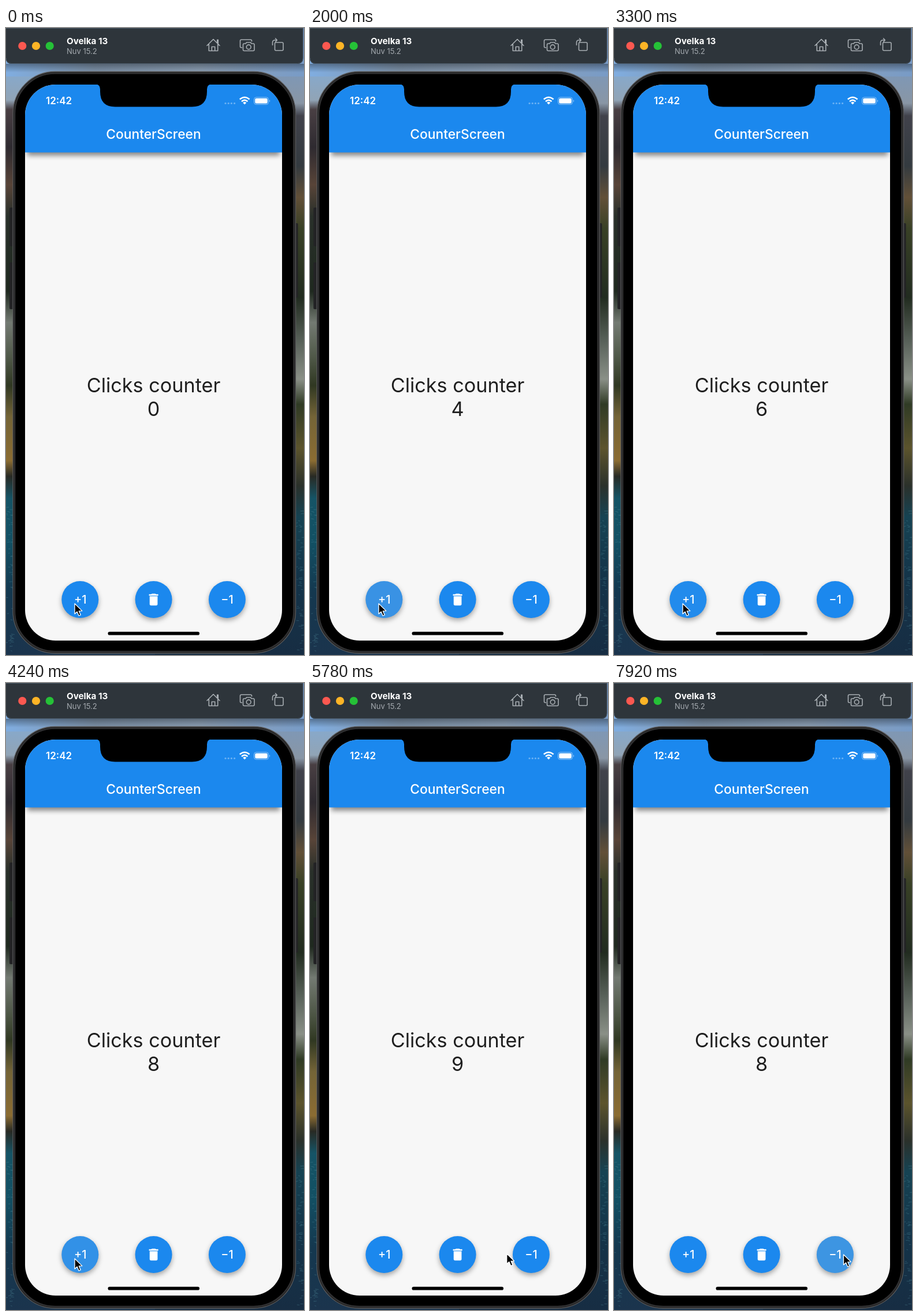
Recreate the animation shown at these times as an HTML page. Size 516 by 1086 pixels, loop 8 s.

```html
<!DOCTYPE html>
<html lang="en">
<head>
<meta charset="utf-8">
<title>Counter</title>
<style>
  html, body { margin: 0; width: 100%; height: 100%; overflow: hidden; background: #152a3c; }
  svg { display: block; width: 100vw; height: 100vh; font-family: Inter, sans-serif; }
  .mid { text-anchor: middle; }
  .fab { filter: drop-shadow(0 4px 4px rgba(0, 0, 0, .34)); }
  .label { font-size: 19.8px; font-weight: 500; fill: #fff; }
  .big { font-size: 34.2px; fill: #1f1f1f; }
  .tool { fill: none; stroke: #a7adb2; stroke-width: 1.6; stroke-linejoin: round; stroke-linecap: round; }
</style>
</head>
<body>
<svg viewBox="0 0 516 1086">
  <defs>
    <linearGradient id="left" x2="0" y2="1086" gradientUnits="userSpaceOnUse">
      <stop offset=".06" stop-color="#83aad2"/>
      <stop offset=".115" stop-color="#91a4b6"/>
      <stop offset=".13" stop-color="#493f43"/>
      <stop offset=".19" stop-color="#2e2a30"/>
      <stop offset=".25" stop-color="#584438"/>
      <stop offset=".3" stop-color="#29302a"/>
      <stop offset=".42" stop-color="#1f291f"/>
      <stop offset=".47" stop-color="#737a72"/>
      <stop offset=".53" stop-color="#4c5544"/>
      <stop offset=".57" stop-color="#303822"/>
      <stop offset=".62" stop-color="#746437"/>
      <stop offset=".69" stop-color="#8b6c32"/>
      <stop offset=".715" stop-color="#282a24"/>
      <stop offset=".75" stop-color="#155466"/>
      <stop offset=".82" stop-color="#125064"/>
      <stop offset=".9" stop-color="#14384f"/>
      <stop offset="1" stop-color="#1b344d"/>
    </linearGradient>
    <linearGradient id="right" x2="0" y2="1086" gradientUnits="userSpaceOnUse">
      <stop offset=".06" stop-color="#7b98bb"/>
      <stop offset=".12" stop-color="#8996a5"/>
      <stop offset=".14" stop-color="#41424b"/>
      <stop offset=".22" stop-color="#343b40"/>
      <stop offset=".27" stop-color="#625038"/>
      <stop offset=".32" stop-color="#394126"/>
      <stop offset=".43" stop-color="#222c20"/>
      <stop offset=".5" stop-color="#59625a"/>
      <stop offset=".56" stop-color="#8a9087"/>
      <stop offset=".6" stop-color="#303b25"/>
      <stop offset=".67" stop-color="#5c542d"/>
      <stop offset=".73" stop-color="#2b312b"/>
      <stop offset=".78" stop-color="#164353"/>
      <stop offset=".88" stop-color="#143449"/>
      <stop offset="1" stop-color="#172d43"/>
    </linearGradient>
    <linearGradient id="sky">
      <stop stop-color="#80ade0"/>
      <stop offset=".3" stop-color="#8095ac"/>
      <stop offset=".65" stop-color="#8fa3b9"/>
      <stop offset="1" stop-color="#789bc6"/>
    </linearGradient>
    <linearGradient id="shade" x2="0" y2="1">
      <stop stop-color="#000" stop-opacity=".34"/>
      <stop offset="1" stop-color="#000" stop-opacity="0"/>
    </linearGradient>
    <filter id="soft" x="-10%" y="-50%" width="120%" height="200%"><feGaussianBlur stdDeviation="4.5"/></filter>
    <clipPath id="screen"><rect x="33" y="98" width="445" height="963" rx="53"/></clipPath>
  </defs>

  <rect width="258" height="1086" fill="url(#left)"/>
  <rect x="258" width="258" height="1086" fill="url(#right)"/>
  <rect width="516" height="84" fill="url(#sky)"/>
  <rect y="62" width="516" height="15" fill="url(#shade)"/>
  <g id="waves" stroke="#4d8796" stroke-width="1" opacity=".4"></g>

  <g fill="#232325">
    <rect x="6" y="311" width="8" height="67" rx="2"/>
    <rect x="6" y="406" width="8" height="81" rx="2"/>
    <rect x="500" y="338" width="5.5" height="129" rx="2"/>
  </g>
  <rect x="12" y="75.5" width="489.5" height="1007.5" rx="73" fill="#1c1c1d" stroke="#5b5b5c" stroke-width="1.3"/>
  <rect x="15" y="78.5" width="483.5" height="1001.5" rx="70" fill="#000" stroke="#303031" stroke-width="2.5"/>

  <g clip-path="url(#screen)">
    <rect x="33" y="98" width="445" height="963" fill="#f7f7f7"/>
    <rect x="37" y="190" width="437" height="31" fill="#000" opacity=".45" filter="url(#soft)"/>
    <rect x="33" y="98" width="445" height="117.5" fill="#1b88ee"/>
  </g>
  <path d="M155 97Q163 98 163 106V110Q163 136.5 189 136.5H322Q348 136.5 348 110V106Q348 98 356 97Z"/>

  <g fill="#fff">
    <text x="69" y="132.3" font-size="17" font-weight="600">12:42</text>
    <g opacity=".35">
      <circle cx="380" cy="130.5" r="1.6"/><circle cx="385.2" cy="130.5" r="1.6"/>
      <circle cx="390.4" cy="130.5" r="1.6"/><circle cx="395.6" cy="130.5" r="1.6"/>
    </g>
    <g fill="none" stroke="#fff" stroke-width="2.6">
      <path d="M404.8 123.6Q413.2 116.4 421.6 123.6M408 127.2Q413.2 122.6 418.4 127.2"/>
    </g>
    <path d="M410.2 129.4Q413.2 126.8 416.2 129.4L413.2 132.5Z"/>
    <rect x="429.5" y="120" width="25" height="12.5" rx="3.8" fill="none" stroke="#fff" stroke-opacity=".5"/>
    <rect x="431.2" y="121.7" width="21.6" height="9.1" rx="2.4"/>
    <path d="M456 124.2Q458 126.2 456 128.4Z" opacity=".6"/>
    <text class="mid" x="255.5" y="191.7" font-size="22.8" font-weight="500">CounterScreen</text>
  </g>

  <text class="mid big" x="255.5" y="630.5">Clicks counter</text>
  <text class="mid big" id="count" x="255.5" y="671.7">0</text>

  <g fill="#1b88ee">
    <circle class="fab" cx="128.3" cy="990" r="32"/>
    <circle class="fab" cx="255.6" cy="990" r="32"/>
    <circle class="fab" cx="382.9" cy="990" r="32"/>
  </g>
  <g fill="#d0c8b0">
    <circle id="plus" cx="128.3" cy="990" r="32" opacity="0"/>
    <circle id="minus" cx="382.9" cy="990" r="32" opacity="0"/>
  </g>
  <text class="mid label" x="128.8" y="997">+1</text>
  <text class="mid label" x="382.9" y="997">−1</text>
  <path fill="#fff" transform="translate(241.9 976.3) scale(1.141)" d="M6 19c0 1.1.9 2 2 2h8c1.1 0 2-.9 2-2V7H6v12zM19 4h-3.5l-1-1h-5l-1 1H5v2h14V4z"/>
  <rect x="176.5" y="1045.8" width="158.5" height="5.7" rx="2.85"/>

  <path d="M0 0H514.5V52Q514.5 62 504.5 62H10Q0 62 0 52Z" fill="#2e353b"/>
  <path d="M0 .5H514.5M0 52Q0 61.5 10 61.5H504.5Q514 61.5 514 52V0" fill="none" stroke="#465563" stroke-width="1"/>
  <circle cx="28.3" cy="31" r="7.1" fill="#fc5850"/>
  <circle cx="52" cy="31" r="7.1" fill="#fdb426"/>
  <circle cx="75.7" cy="31" r="7.1" fill="#25c137"/>
  <text x="105" y="28.3" font-size="15.2" font-weight="700" fill="#fff">Ovelka 13</text>
  <text x="105" y="45" font-size="13" fill="#a4aaaf">Nuv 15.2</text>
  <g class="tool">
    <path d="M348 30.5L359 19.5L370 30.5M351.3 28.5V39.5H366.7V28.5M356.3 39V32.5H361.7V39M365.8 25.5V20.5H367.3V27"/>
    <path d="M408.5 34H407.5Q405.5 34 405.5 32V22.2Q405.5 20.2 407.5 20.2H423.5Q425.5 20.2 425.5 22.2V23"/>
    <path d="M412.5 27H415L416.5 25H423.5L425 27H428Q430 27 430 29V37.5Q430 39.5 428 39.5H412.5Q410.5 39.5 410.5 37.5V29Q410.5 27 412.5 27Z"/>
    <circle cx="420.2" cy="33" r="3.9"/>
    <rect x="465.5" y="25" width="14.5" height="14" rx="2"/>
    <path d="M461.5 29.5V25Q461.5 21 466 21H469M466.5 18L469.3 21L466.5 24"/>
  </g>

  <path id="cursor" d="M0 0V17.8L4.1 14L7.1 21L10.2 19.6L7.3 12.9L12.8 12.6Z" fill="#000" stroke="#fff" stroke-width="1.3" stroke-linejoin="round"/>
</svg>
<script>
const $ = id => document.getElementById(id);
const LOOP = 8000;
const ADDS = [110, 700, 1270, 1860, 2460, 2980, 3510, 4040, 4690];
const SUBS = [7850];
const clamp = v => Math.max(0, Math.min(1, v));
const before = (list, t) => list.filter(c => c <= t).length;

// Button tint: quick rise before the click, short hold, then fade.
const tint = (list, t) => Math.max(...list.map(c =>
  .19 * Math.min(clamp((t - c + 90) / 80), clamp((380 - t + c) / 280))));

let seed = 7;
const rand = () => (seed = seed * 16807 % 2147483647) / 2147483647;
let waves = "";
for (let i = 0; i < 110; i++) {
  const x = i % 2 ? 502 + rand() * 10 : rand() * 10, y = 830 + rand() * 255;
  waves += `<path d="M${x} ${y}l${2 + rand() * 4} ${rand() * 2 - 1}"/>`;
}
$("waves").innerHTML = waves;

function draw(now) {
  const t = now % LOOP;
  $("count").textContent = before(ADDS, t) - before(SUBS, t);
  $("plus").setAttribute("opacity", t < 40 ? 0 : tint(ADDS, t));
  $("minus").setAttribute("opacity", tint(SUBS, t));
  const u = clamp((t - 5050) / 1030), s = u * u * (3 - 2 * u);
  const x = 119 + 278.5 * s, y = 997 - 7 * s - 5 * Math.sin(Math.PI * s);
  $("cursor").setAttribute("transform", `translate(${x} ${y})`);
  requestAnimationFrame(draw);
}
draw(performance.now());
</script>
</body>
</html>
```
